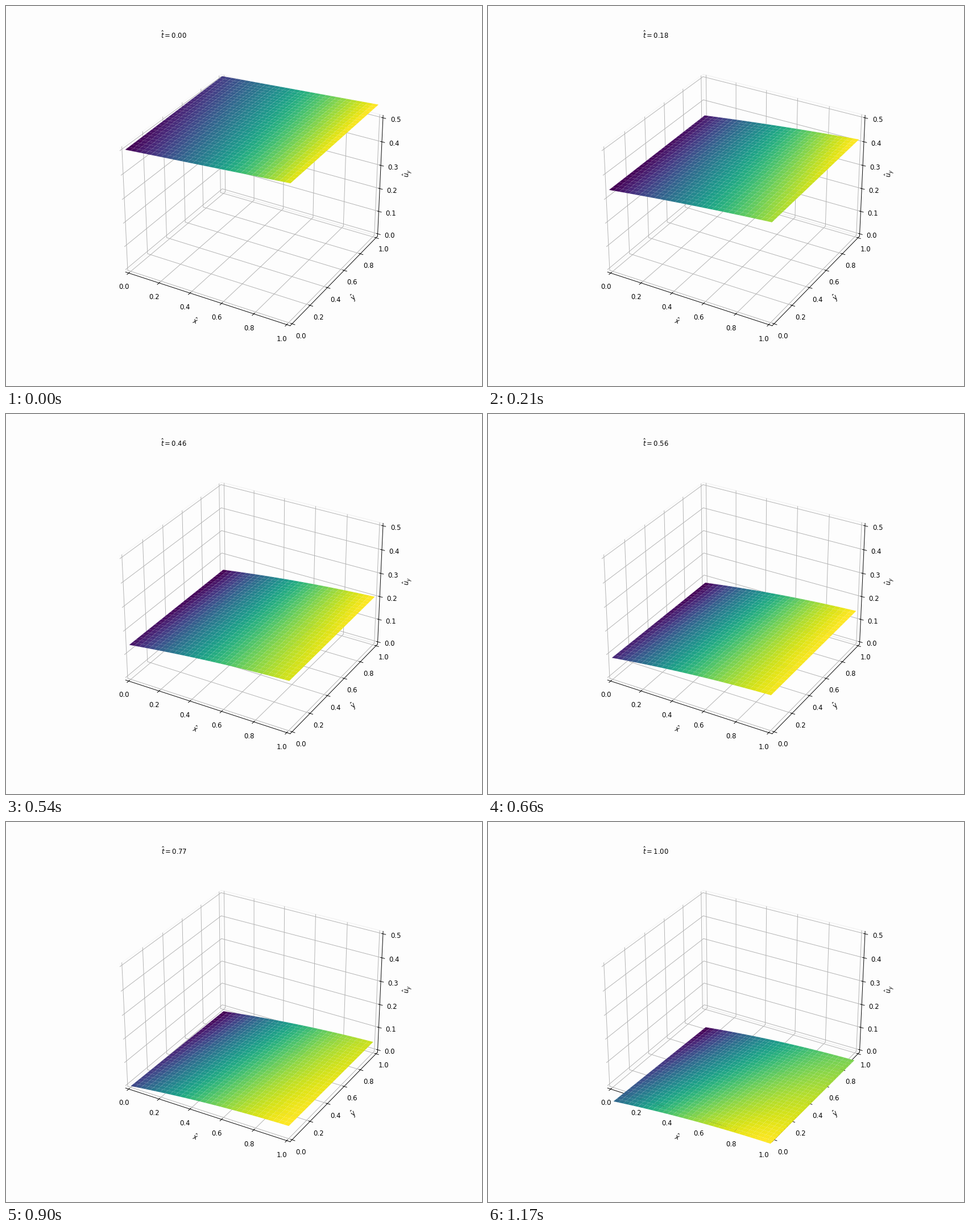
Animation of 837x669 px, one loop 1.2 s. Source, as a matplotlib script:

```python
import numpy as np
import matplotlib.pyplot as plt
from matplotlib.animation import FuncAnimation

W, H, DPI = 837, 669, 83.7
FRAMES, INTERVAL = 40, 30
BACK = "#fdfdfd"
MARGIN = 1 / 48

grid = np.linspace(0, 1, 32)
X, Y = np.meshgrid(grid, grid)


def height(t):
    """A sinking sheet, tilted along x and y and slowly bulging along x."""
    start = np.exp(-10 * t)  # short transient at the beginning
    level = 0.5014 - 1.005 * t + 0.516 * t**2 - 0.085 * t**3
    tilt_x = 0.0745 - 0.034 * t - 0.022 * start
    tilt_y = 0.010 - 0.031 * t
    twist = 0.009 - 0.016 * start
    bulge = 0.038 * np.tanh(2.5 * t)
    return (level + tilt_x * X + tilt_y * Y + twist * X * Y
            + bulge * X * (1 - X))


def padded(top):
    return -top * MARGIN, top * (1 + MARGIN)


# The tiny surplus keeps the pixel size from being truncated.
fig = plt.figure(figsize=((W + 1e-6) / DPI, (H + 1e-6) / DPI), dpi=DPI,
                 facecolor=BACK)
ax = fig.add_subplot(projection="3d", facecolor=BACK)
ax.set_xlim(*padded(1))
ax.set_ylim(*padded(1))
ax.set_zlim(*padded(0.5))
ax.set_xlabel(r"$\hat{x}$")
ax.set_ylabel(r"$\hat{y}$")
ax.set_zlabel(r"$\hat{u}_y$")
for axis in (ax.xaxis, ax.yaxis, ax.zaxis):
    axis.pane.set_fill(False)

clock = fig.text(295 / W, 1 - 57 / H, "", ha="center", va="baseline")
surface = None


def update(i):
    global surface
    if surface is not None:
        surface.remove()
    t = i / (FRAMES - 1)
    surface = ax.plot_surface(X, Y, height(t), cmap="viridis")
    clock.set_text(rf"$\hat{{t}} = {t:.2f}$")
    return surface, clock


anim = FuncAnimation(fig, update, frames=FRAMES, interval=INTERVAL,
                     init_func=lambda: update(0), repeat=True)
plt.show()
```
